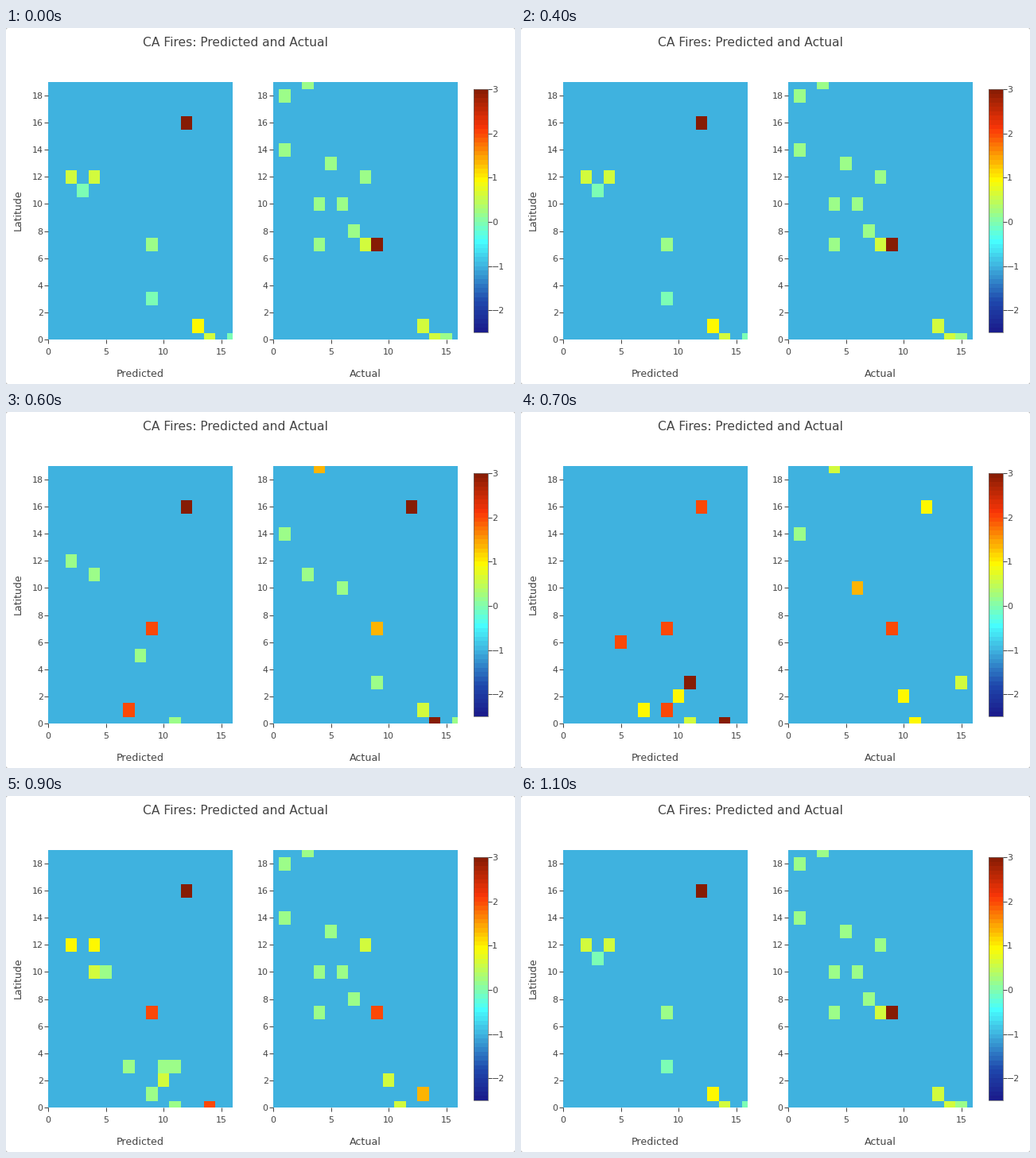
Recreate the animation shown at these times as a matplotlib script. Size 640 px wide and 448 px high, loop 1400 ms.

```python
import numpy as np
import matplotlib.pyplot as plt
from matplotlib.animation import FuncAnimation
from matplotlib.colors import LinearSegmentedColormap
from matplotlib.patches import Polygon, Rectangle

W, H, DPI = 640, 448, 100
PX = 72 / DPI
INK = "#444444"
NX, NY = 16, 19
TOP, BOTTOM = 68, 392
LEFTS = (53, 336)
DX, DY = 14.5, (BOTTOM - TOP) / NY
VMIN, VMAX, QUIET = -2.5, 3, -1

JET = LinearSegmentedColormap.from_list("soft_jet", [
    (0, "#1b1b8b"), (0.125, "#1f47ac"), (0.273, "#40b4e0"),
    (0.375, "#48ffff"), (0.625, "#fffb00"), (0.84, "#fb3608"),
    (1, "#861c04")])

# Fire levels, and the places that keep coming back
MINT, GREEN, LIME, YELLOW, GOLD, RED, HOT = -0.05, 0.2, 0.6, 0.95, 1.35, 2, 3
PEAK, CORE, BAY, CAPE, WOOD = (12, 16), (9, 7), (1, 14), (4, 19), (6, 10)
DELTA, MOUTH = (10, 2), (11, 0)
CREEK, SHORE = (13, 1), (14, 0)
WEST = [(2, 12), (4, 12)]
ARC = [CAPE, PEAK, BAY, WOOD, CORE]
NORTH = [(3, 19), (1, 18), BAY, (5, 13), (4, 10), WOOD, (7, 8), (4, 7)]

# Each stage: predicted and actual; later levels paint over earlier ones
CALM = (
    {MINT: [(3, 11), (9, 3), (16, 0)], GREEN: [CORE],
     LIME: WEST + [SHORE], YELLOW: [CREEK], HOT: [PEAK]},
    {GREEN: NORTH + [(8, 12), (15, 0)],
     LIME: [(8, 7), CREEK, SHORE], HOT: [CORE]},
)
SPREAD = (
    {GREEN: [WEST[0], (4, 11), (8, 5), MOUTH],
     RED: [CORE, (7, 1)], HOT: [PEAK]},
    {GREEN: ARC + [(3, 11), (9, 3), (16, 0)], LIME: [CREEK],
     GOLD: [CAPE, CORE], HOT: [PEAK, SHORE]},
)
SOUTH = (
    {LIME: [MOUTH], YELLOW: [DELTA, (7, 1)],
     RED: [PEAK, CORE, (5, 6), (9, 1)], HOT: [(11, 3), SHORE]},
    {GREEN: [BAY], LIME: [CAPE, (15, 3)], YELLOW: [PEAK, DELTA, MOUTH],
     GOLD: [WOOD], RED: [CORE]},
)
BUSY = (
    {GREEN: [(5, 10), (7, 3), (10, 3), (11, 3), (9, 1), MOUTH],
     LIME: [(4, 10), DELTA], YELLOW: WEST, RED: [CORE, SHORE], HOT: [PEAK]},
    {GREEN: NORTH, LIME: [(8, 12), DELTA, MOUTH],
     GOLD: [CREEK], RED: [CORE]},
)
TIMELINE = [CALM] * 5 + [SPREAD] * 2 + [SOUTH] + [BUSY] * 3 + [CALM] * 3


def grid(levels):
    z = np.full((NY + 1, NX + 1), float(QUIET))
    for level, cells in levels.items():
        for x, y in cells:
            z[y, x] = level
    return z


fig = plt.figure(figsize=(W / DPI, H / DPI), dpi=DPI, facecolor="white")
ax = fig.add_axes([0, 0, 1, 1])
ax.axis("off")


def label(x, y, text, size, ha="center", **kw):
    ax.text(x, y, text, fontsize=size * PX, family="DejaVu Sans", color=INK,
            ha=ha, va="baseline", **kw)


def tick(x0, y0, x1, y1):
    ax.plot([x0, x1], [y0, y1], color=INK, lw=PX, solid_capstyle="butt")


def image(z, x0, x1, top, bottom):
    return ax.imshow(z, cmap=JET, vmin=VMIN, vmax=VMAX, origin="lower",
                     extent=(x0, x1, bottom, top), aspect="auto",
                     interpolation="nearest")


def heatmap(left):
    im = image(grid({}), left - DX / 2, left + (NX + 0.5) * DX,
               TOP - DY / 2, BOTTOM + DY / 2)
    im.set_clip_path(Rectangle((left, TOP), NX * DX, BOTTOM - TOP,
                               transform=ax.transData))
    return im


def axes_marks(left, name):
    for v in range(0, NY, 2):
        y = BOTTOM - v * DY
        tick(left - 5, y, left, y)
        label(left - 6.3, y + 4, str(v), 11, "right")
    for v in range(0, NX, 5):
        x = left + v * DX
        tick(x, BOTTOM, x, BOTTOM + 5)
        label(x, BOTTOM + 19, str(v), 11)
    label(left + NX * DX / 2, 439, name, 12.6)


def colorbar(x0, x1, top, bottom):
    image(np.arange(VMIN + 0.05, VMAX, 0.1)[:, None], x0, x1, top, bottom)
    ax.add_patch(Rectangle((x0, top), x1 - x0, bottom - top, fill=False,
                           ec="#666666", lw=0.7 * PX))
    for v in range(-2, 4):
        y = top + (VMAX - v) * (bottom - top) / (VMAX - VMIN)
        tick(x1, y, x1 + 5, y)
        label(x1 + 5.5, y + 4, str(v).replace("-", "\u2212"), 11, "left")
    # The labels are cut off at the plot's right margin.
    ax.add_patch(Rectangle((625, top - 10), 15, bottom - top + 20,
                           color="white", lw=0, zorder=10))


maps = [heatmap(left) for left in LEFTS]
for left, name in zip(LEFTS, ("Predicted", "Actual")):
    axes_marks(left, name)
colorbar(587.5, 605.5, 77, 383)
label(288.3, 23, "CA Fires: Predicted and Actual", 15.55)
label(19, 229.3, "Latitude", 12.5, rotation=90, rotation_mode="anchor")

for cx, sx in ((0, 2), (W, -2)):
    for cy, sy in ((0, 2), (H, -2)):
        ax.add_patch(Polygon([(cx, cy), (cx + sx, cy), (cx, cy + sy)],
                             color="#c0c0c0", lw=0))

ax.set_xlim(0, W)
ax.set_ylim(H, 0)


def draw(i):
    for im, levels in zip(maps, TIMELINE[i]):
        im.set_data(grid(levels))
    return maps


anim = FuncAnimation(fig, draw, frames=len(TIMELINE), interval=100,
                     repeat=True, repeat_delay=0, blit=False)
plt.show()
```
